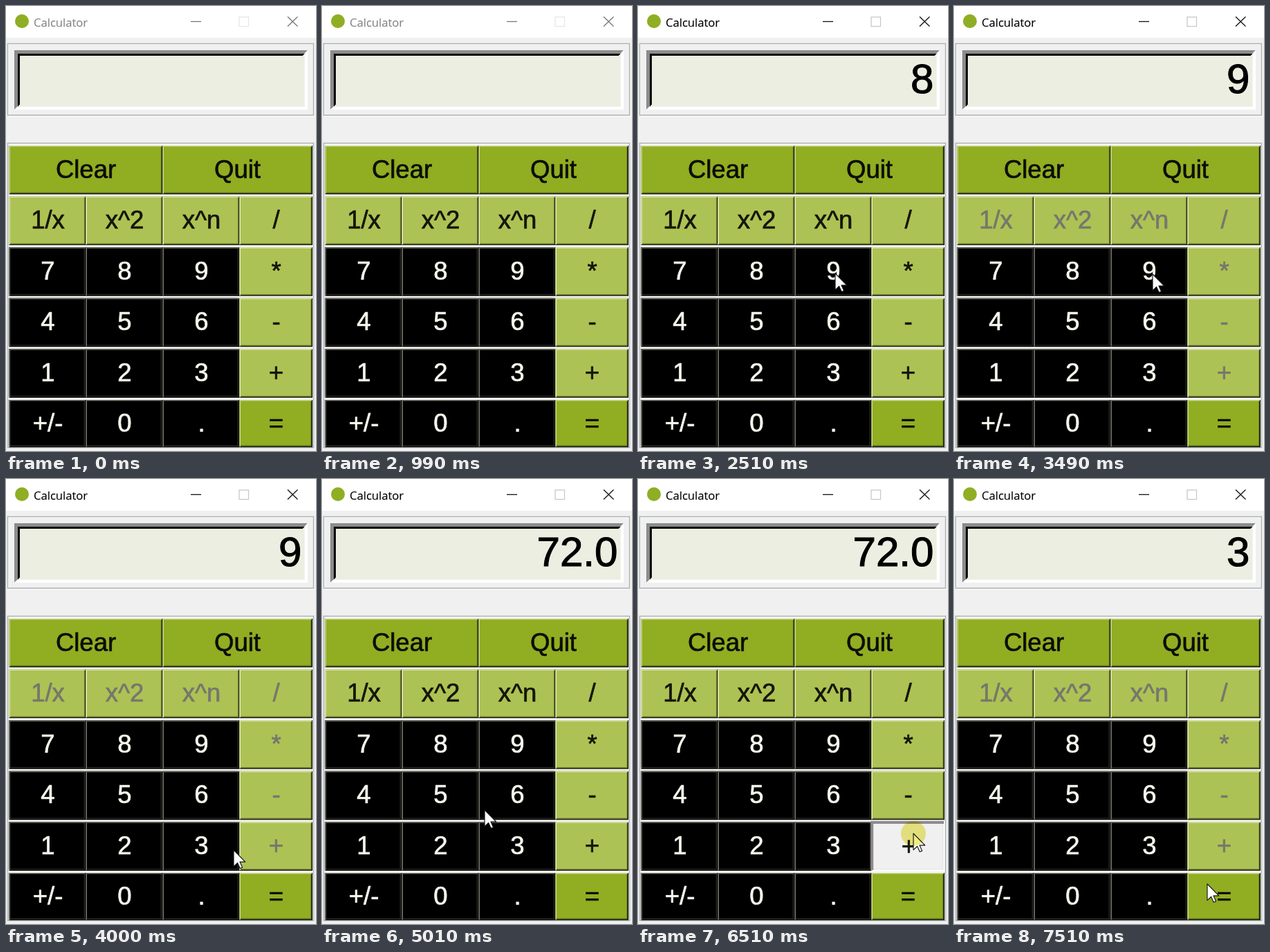
These frames come from a looping animation (448 px wide and 644 px high, 8000 ms). An HTML page:

```html
<!DOCTYPE html>
<html lang="en">
<head>
<meta charset="utf-8">
<title>Calculator</title>
<style>
  html, body { margin: 0; width: 100%; height: 100%; overflow: hidden; background: #f0f0f0; }
  svg { display: block; width: 448px; height: 644px; }
  text { font-family: "Liberation Sans", Arial, sans-serif; fill: currentColor; stroke: currentColor; }
  #title { font-family: "Open Sans", "Noto Sans", sans-serif; font-size: 16.6px; stroke-width: .15; }
  #keys text { font-size: 36.5px; text-anchor: middle; stroke-width: .7; }
  #value { font-size: 60px; text-anchor: end; stroke-width: 1.1; }
  #halo { mix-blend-mode: multiply; }
</style>
</head>
<body>
<svg viewBox="0 0 448 644">
  <rect width="448" height="644" fill="#f0f0f0"/>
  <rect width="448" height="46" fill="#fff"/>
  <circle cx="23" cy="22" r="10" fill="#8fae24"/>
  <text id="title" x="40" y="30">Calculator</text>
  <g id="controls" fill="none" stroke-width="1.3">
    <path d="M267 22.5H282"/>
    <rect id="maximize" x="337" y="16" width="13.5" height="13.5"/>
    <path d="M407 15.5L421.500 29.500M421.500 15.500L407 29.500"/>
  </g>

  <g fill="none">
    <rect x="3.500" y="55.500" width="442" height="104" stroke="#fff"/>
    <rect x="2.500" y="54.500" width="442" height="103.500" stroke="#a9b0b0" stroke-width="1.4"/>
  </g>
  <path d="M12 150V64H436L431 69H17V145Z" fill="#8c8c8c"/>
  <path d="M12 150L17 145.500H431.500V69L436 64V150Z" fill="#fff"/>
  <rect x="17" y="69" width="414.500" height="76.500" fill="#ebeee0"/>
  <path d="M17 145.500V69H431.500L428.500 72H20V142.500Z" fill="#050505"/>
  <text id="value" x="427.300" y="126"></text>

  <rect x="2.500" y="198.500" width="442" height="440.500" fill="#f6f6f4" stroke="#a9b0b0" stroke-width="1.4"/>
  <g id="keys"></g>
  <path id="cursor" d="M0 0V17L4 13.200L6.600 19L9 18L6.400 12.200H12Z"
        fill="#fff" stroke="#111" stroke-width=".8" stroke-linejoin="round"/>
  <circle id="halo" r="18" fill="#f1ec85"/>
</svg>
<script>
const NS = "http://www.w3.org/2000/svg";
const byId = id => document.getElementById(id);
const GREEN = { face: "#91ad22", light: "#cbd78c", shade: "#5f7216", edge: "#14180a", ink: "#0c0d06" };
const LIME = { face: "#adc254", light: "#e0e8b4", shade: "#7d8d3a", edge: "#1c200c", ink: "#14150a" };
const BLACK = { face: "#000", light: "#77776e", shade: "#2c2c28", edge: "#000", ink: "#f8f8ee" };
const PRESSED = { face: "#f0f0f0", light: "#8f8b91", shade: "#e6e6e6", edge: "#fff", ink: "#14150a" };
const LOCKED = { ...LIME, ink: "#74786c" };
const LOOP = 8000;

const rows = ["Clear Quit", "1/x x^2 x^n /", "7 8 9 *", "4 5 6 -", "1 2 3 +", "+/- 0 . ="];
const edges = [4.5, 115.500, 226.500, 337.500, 443];
const centers = [60.5, 171.500, 282.500, 390.500];
const operators = {};

// start, display, cursor x, cursor y, operators locked, pressed key
const steps = [
  [0, "", null, null, false],
  [1490, "8", 175, 392, false],
  [2010, "8", 178, 392, false],
  [2510, "8", 285, 387, false],
  [3000, "8", 392, 387, true],
  [3490, "9", 287, 388, true],
  [4000, "9", 329, 537, true],
  [4500, "72.0", 389, 594, false],
  [5010, "72.0", 235, 479, false],
  [5510, "72.0", 235, 479, false],
  [6010, "72.0", 330, 500, false],
  [6510, "72.0", 398, 513, false, "+"],
  [7010, "3", 290, 532, true],
  [7510, "3", 366, 586, true]
];

function add(parent, tag, attrs) {
  const el = document.createElementNS(NS, tag);
  for (const name in attrs) el.setAttribute(name, attrs[name]);
  return parent.appendChild(el);
}

function addKey(label, x, y, w, h, cx, base) {
  const g = add(byId("keys"), "g", {});
  const key = {
    edge: add(g, "rect", { x, y, width: w, height: h }),
    shade: add(g, "rect", { x, y, width: w - 1.5, height: h - 1.5 }),
    face: add(g, "rect", { x, y, width: w - 2.8, height: h - 2.8 }),
    light: add(g, "path", { d: `M${x + .7} ${y + h - 1}V${y + .7}H${x + w - 1}`, fill: "none" }),
    text: add(g, "text", { x: cx, y: base })
  };
  key.text.textContent = label;
  return key;
}

function paint(key, style) {
  const down = style === PRESSED;
  for (const part of ["edge", "shade", "face"]) key[part].setAttribute("fill", style[part]);
  key.light.setAttribute("stroke", style.light);
  key.light.setAttribute("stroke-width", down ? 4 : 1.5);
  key.text.setAttribute("color", style.ink);
  key.text.setAttribute("transform", down ? "translate(1 1)" : "");
}

rows.forEach((line, r) => {
  const labels = line.split(" "), span = 4 / labels.length;
  const y = 202 + r * 73.6, h = r === 5 ? 68.5 : 70.5;
  labels.forEach((label, c) => {
    const from = edges[c * span], to = edges[(c + 1) * span];
    const cx = r ? centers[c] : [115.500, 334.500][c];
    const style = !r || label === "=" ? GREEN : r === 1 || c === 3 ? LIME : BLACK;
    const key = addKey(label, from, y, to - from, h, cx, 249 + r * 73.45);
    paint(key, style);
    if (style === LIME) operators[label] = key;
  });
});

function draw(time) {
  const t = time % LOOP;
  const [, value, x, y, locked, pressed] = steps.filter(step => step[0] <= t).pop();
  const active = x !== null;
  byId("value").textContent = value;
  byId("title").setAttribute("color", active ? "#000" : "#858585");
  byId("controls").setAttribute("stroke", active ? "#111" : "#777");
  byId("maximize").setAttribute("stroke", active ? "#c8c8c8" : "#e6e6e6");

  for (const label in operators) {
    paint(operators[label], label === pressed ? PRESSED : locked ? LOCKED : LIME);
  }

  byId("cursor").setAttribute("visibility", active ? "visible" : "hidden");
  byId("halo").setAttribute("visibility", pressed ? "visible" : "hidden");
  if (active) {
    byId("cursor").setAttribute("transform", `translate(${x} ${y}) scale(1.4)`);
    byId("halo").setAttribute("transform", `translate(${x} ${y})`);
  }
}

const start = performance.now();
function tick(now) {
  draw(Math.max(0, now - start));
  requestAnimationFrame(tick);
}
draw(0);
requestAnimationFrame(tick);
</script>
</body>
</html>
```
